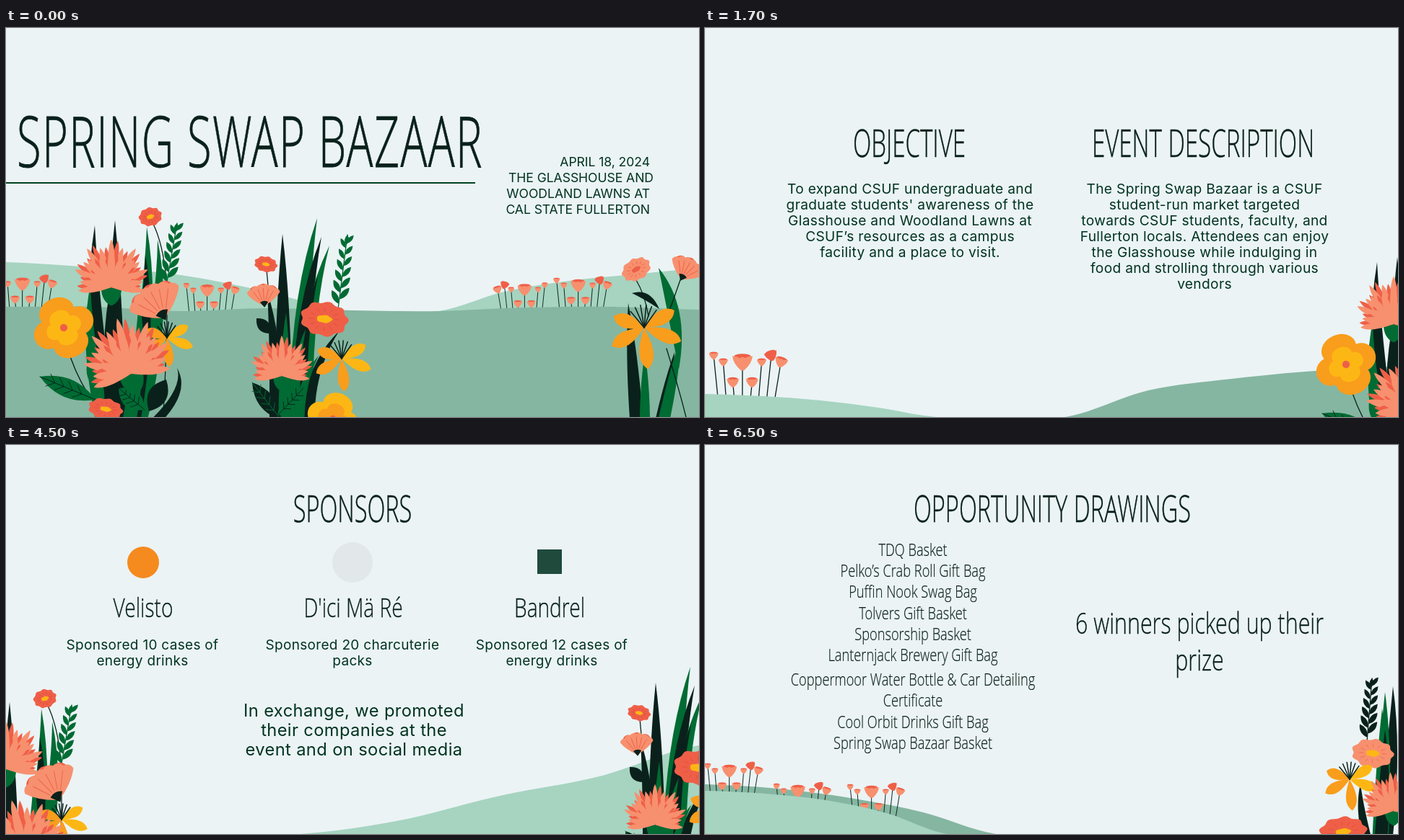
Recreate the animation shown at these times as an HTML page. Size 960 by 540 pixels, loop 8 s.

```html
<!DOCTYPE html>
<html lang="en">
<head>
<meta charset="utf-8">
<title>Spring Swap Bazaar</title>
<style>
html, body { margin: 0; width: 100%; height: 100%; overflow: hidden; background: #ebf3f5; }
svg { display: block; width: 100%; height: 100%; }
.head { font-family: "Open Sans", "Noto Sans", sans-serif; font-weight: 300; }
.body { font-family: Inter, Roboto, sans-serif; font-weight: 400; letter-spacing: .016em; }
.caps { letter-spacing: -.004em; }
</style>
</head>
<body>
<svg id="stage" viewBox="0 0 960 540"></svg>
<script>
const DARK = '#0a211b', GREEN = '#006b33', INK = '#00331f', LIGHT = '#a6d4c0', HILL = '#85b6a1',
  PINK = '#f7906e', RED = '#ef5f48', ORANGE = '#f99d1c', GOLD = '#fdb714', RUST = '#d94a35';

// basic marks
const n = v => Math.round(v * 100) / 100;
const rad = a => a * Math.PI / 180;
const fill = (d, c, more = '') => `<path d="${d}" fill="${c}" ${more}/>`;
const line = (d, c = DARK, w = 1.3) => `<path d="${d}" fill="none" stroke="${c}" stroke-width="${w}" stroke-linecap="round"/>`;
const oval = (x, y, rx, ry, c, more = '') => `<ellipse cx="${n(x)}" cy="${n(y)}" rx="${n(rx)}" ry="${n(ry)}" fill="${c}" ${more}/>`;
const at = (x, y, rot, art) => `<g transform="translate(${x} ${y}) rotate(${rot})">${art}</g>`;
const move = (x, y, art) => at(x, y, 0, art);
const each = (list, fn) => list.map(fn).join('');
const span = (a, b, step) => Array.from({ length: Math.round((b - a) / step) + 1 }, (_, i) => a + i * step);

// smooth hill through evenly spaced heights, filled down to the floor
function hill(x0, x1, ys, c) {
  const step = (x1 - x0) / (ys.length - 1);
  const slope = i => ((ys[i + 1] ?? ys[i]) - (ys[i - 1] ?? ys[i])) / 6;
  const top = each(ys.slice(1), (y, i) => {
    const x = x0 + i * step;
    return `C${n(x + step / 3)} ${n(ys[i] + slope(i))} ${n(x + step * 2 / 3)} ${n(y - slope(i + 1))} ${n(x + step)} ${y}`;
  });
  return fill(`M${x0} ${ys[0]}${top}V540H${x0}Z`, c);
}

// leaf shape from one point to another; taper 1 is pointed at both ends, 0 is open at the root
function lens(x0, y0, x1, y1, w, c, taper = 1, bx = (x0 + x1) / 2, by = (y0 + y1) / 2) {
  const len = Math.hypot(x1 - x0, y1 - y0), k = taper ? 1 : .5;
  const nx = -(y1 - y0) / len * w * k, ny = (x1 - x0) / len * w * k, r = 1 - taper;
  return fill(`M${n(x0 + nx * r)} ${n(y0 + ny * r)}Q${n(bx + nx)} ${n(by + ny)} ${n(x1)} ${n(y1)}` +
    `Q${n(bx - nx)} ${n(by - ny)} ${n(x0 - nx * r)} ${n(y0 - ny * r)}Z`, c);
}

// tuft of blades that share a root and alternate in colour
const grass = (rx, ry, bend, tips) => each(tips, ([x, y], i) =>
  lens(rx + (x - rx) * .45, ry, x, y, 8 + (ry - y) * .06, i % 2 ? GREEN : DARK, 0,
    rx + (x - rx) * bend, ry + (y - ry) * .6));

function leaf(x0, y0, x1, y1, w, c = GREEN, vein = DARK) {
  const dx = x1 - x0, dy = y1 - y0, k = w * .35 / Math.hypot(dx, dy);
  const ribs = each(span(.25, .73, .16), t => {
    const x = x0 + dx * t, y = y0 + dy * t, ex = x + dx * .12, ey = y + dy * .12;
    return line(`M${n(ex - dy * k)} ${n(ey + dx * k)}L${n(x)} ${n(y)}L${n(ex + dy * k)} ${n(ey - dx * k)}`, vein, .9);
  });
  return lens(x0, y0, x1, y1, w, c) + line(`M${x0} ${y0}L${x1} ${y1}`, vein, 1) + ribs;
}

function sprig(x0, y0, x1, y1, c = GREEN, size = 19) {
  const a = Math.atan2(y1 - y0, x1 - x0);
  const leaves = each(span(.1, .85, .15), t => each([-1, 1], side => {
    const k = t + side * .03, x = x0 + (x1 - x0) * k, y = y0 + (y1 - y0) * k;
    const b = a + side * .6, l = size * (1.15 - .4 * t);
    return lens(x, y, x + l * Math.cos(b), y + l * Math.sin(b), l * .38, c);
  }));
  return line(`M${x0} ${y0}L${x1} ${y1}`, c) + leaves + lens(x0 + (x1 - x0) * .86, y0 + (y1 - y0) * .86, x1, y1, 6, c);
}

// flowers
const petal = (l, w, a, c) => fill(`M0 0C${n(-w * .7)} ${n(-l * .4)} ${n(-w * 1.1)} ${n(-l * .78)} 0 ${n(-l)}` +
  `C${n(w * 1.1)} ${n(-l * .78)} ${n(w * .7)} ${n(-l * .4)} 0 0Z`, c, `transform="rotate(${n(a)})"`);

function mum(x, y, r, rot = 0) {
  const base = fill(`M${n(-.22 * r)} 0Q${n(-.22 * r)} ${n(.3 * r)} 0 ${n(.4 * r)}Q${n(.22 * r)} ${n(.3 * r)} ${n(.22 * r)} 0Z`, GREEN);
  const fan = (edge, step, size, w, c) => each(span(-edge, edge, step), (a, i) =>
    petal(r * (.72 + .28 * Math.cos(rad(a))) * size * (i % 2 ? .9 : 1.04), r * w, a, c));
  return at(x, y, rot, base + fan(88, 16, .98, .09, RED) + fan(96, 16, 1, .1, PINK) +
    fan(70, 20, .72, .08, RED) + fan(80, 20, .8, .115, PINK));
}

function pansy(x, y, r, rot = 0, outer = ORANGE, inner = GOLD, eye = RED) {
  const ring = (k, c) => each(span(0, 270, 90), (a, i) =>
    oval(r * k * .55, 0, r * k * .46, r * k * (i % 2 ? .58 : .46), c, `transform="rotate(${a})"`));
  return at(x, y, rot, oval(0, 0, r * .4, r * .4, outer) + ring(1, outer) + ring(.58, inner) + oval(0, 0, r * .12, r * .12, eye));
}

// poppy seen from the side, (x, y) is its foot
function cup(x, y, r, rot = 0) {
  const p = (a, k) => `${n(r * k * Math.sin(a))} ${n(-r * k * Math.cos(a))}`;
  const edge = each(span(-.6, .9, .3), a => `Q${p(a - .15, 1.08)} ${p(a, .97)}`);
  return at(x, y, rot,
    each(span(-.5, .5, .5), a => oval(r * .8 * Math.sin(a), -r * .8 * Math.cos(a), r * .25, r * .24, RED)) +
    fill(`M0 0Q${p(-1.1, .6)} ${p(-.9, .97)}${edge}Q${p(1.1, .6)} 0 0Z`, PINK) +
    each(span(-.6, .6, .3), a => line(`M${p(a, .3)}L${p(a, .82)}`, RED, .9)) +
    fill(`M${p(-.8, .26)}Q0 ${n(-r * .3)} ${p(.8, .26)}L0 ${n(r * .06)}Z`, DARK));
}

// open poppy
function bloom(x, y, rx, ry, rot = 0, c = RED, mark = RUST, eye = GOLD) {
  const wavy = (k, m, flat) => 'M' + span(0, 6.2, .1).map(a => {
    const q = k * (1 + .06 * Math.cos(m * a) + .03 * Math.sin(2 * a));
    return `${n(rx * q * Math.cos(a))} ${n(ry * q * flat * Math.sin(a))}`;
  }).join('L') + 'Z';
  const rays = each(span(0, 330, 30), a => {
    const u = rx * Math.cos(rad(a)), v = ry * Math.sin(rad(a));
    return line(`M${n(u * .45)} ${n(v * .45)}L${n(u * .65)} ${n(v * .65)}`, mark, .7);
  });
  return at(x, y, rot, fill(wavy(.97, 9, 1), c) + rays + fill(wavy(.32, 5, .7), eye));
}

function lily(x, y, r, c = GOLD, rot = 0) {
  const petals = each([200, -30, 150, 20, 85], (a, i) => petal(r * (.85 + .06 * i), r * .27, a + 90, i % 2 ? c : ORANGE));
  const threads = each(span(-45, 40, 17), a =>
    line(`M0 0L${n(r * .5 * Math.sin(rad(a)))} ${n(-r * .6 * Math.cos(rad(a)))}`, DARK, 1.5));
  return at(x, y, rot, petals + threads);
}

// eight small poppies: two low ones, a big one in the middle, the last two tilted
function row(x, y, s = .75, flip = 1) {
  const art = each(span(0, 7, 1), i => {
    const low = i === 2 || i === 4, late = i > 5;
    const hx = i * 13.3 - 39, hy = low ? 30 : i % 2 ? 2 : -7;
    const size = i === 3 ? 14 : low ? 8.5 : late ? 9 : 6.5;
    return line(`M${n(hx)} ${hy}L${n(hx * .85)} 51`) +
      `<g transform="translate(${n(hx)} ${hy}) rotate(${late ? 34 * (i - 6.5) : 0}) scale(${size})">` +
      oval(0, -.6, .82, .24, RED) +
      fill('M-1-.6Q-.5-.6-.3-.4Q0-.65 .3-.4Q.5-.6 1-.6Q.9 .2 .15 .8H-.15Q-.9 .2-1-.6Z', i === 6 ? RED : PINK) + '</g>';
  });
  return `<g transform="translate(${x} ${y}) scale(${s * flip} ${s})">${art}</g>`;
}

// bouquets
const bedA =
  grass(155, 560, 1.2, [[123, 274], [195, 276], [151, 267], [210, 294], [193, 315], [117, 357], [142, 375], [184, 375], [237, 472]]) +
  line('M203 270Q218 300 222 350T215 590') + line('M84 440Q95 480 118 515') +
  sprig(222, 358, 237, 271) + lens(114, 488, 115, 458, 6, GREEN) +
  leaf(124, 516, 47, 484, 26) + leaf(192, 530, 156, 500, 26) + lens(198, 532, 222, 488, 26, DARK) +
  bloom(200, 262, 16, 13, -20) + mum(146, 360, 64) + pansy(80, 416, 43, -25) +
  lily(223, 430, 37) + cup(220, 403, 50, -28) + mum(173, 480, 76, -14) + bloom(138, 529, 24, 15, 8);

const bedB =
  grass(385, 560, .4, [[383, 286], [431, 264], [437, 290], [448, 302], [432, 345], [415, 418], [362, 365], [388, 395], [462, 420], [433, 455]]) +
  line('M361 336L367 400') + sprig(460, 390, 473, 287) +
  lens(347, 403, 367, 424, 16, DARK) + leaf(381, 544, 341, 492, 22, DARK, GREEN) + leaf(376, 538, 412, 500, 20) +
  bloom(360, 328, 16, 11, 8) + cup(358, 386, 30, -4) + bloom(441, 404, 33, 24, 3) +
  mum(382, 483, 54) + lily(465, 459, 42) + pansy(453, 542, 36, 20, GOLD, ORANGE);

const bedC =
  grass(885, 560, .8, [[862, 382], [885, 452], [926, 450], [936, 425]]) +
  lens(932, 474, 904, 333, 16, GREEN, 1, 932, 390) + lens(905, 390, 867, 368, 9, DARK, 1, 888, 368) +
  line('M935 347Q924 380 912 410') + line('M873 350Q885 370 890 400') + line('M915 445Q932 500 942 540') +
  bloom(873, 335, 21, 15, -34, PINK, RED, RED) + cup(935, 349, 32, 28) + lily(884, 416, 53, ORANGE);

const bedD =
  sprig(68, 345, 54, 285, DARK, 15) + sprig(172, 402, 185, 320, DARK, 17) +
  grass(115, 560, 1.05, [[128, 302], [157, 322], [71, 303], [27, 424], [186, 300], [190, 355], [120, 352], [72, 375], [160, 400]]) +
  line('M211 312L190 400') + line('M47 423L55 450') + sprig(118, 530, 106, 445, DARK) + leaf(112, 432, 92, 380, 20) +
  cup(152, 308, 27, -6) + pansy(214, 304, 20, 25, GOLD, ORANGE, ORANGE) + bloom(146, 341, 19, 13, 18) +
  mum(67, 373, 48, 6) + cup(194, 382, 40, 35) + cup(47, 424, 32, 2) +
  lily(158, 404, 44) + pansy(75, 463, 39, 35, RED, PINK, GOLD) +
  bloom(162, 477, 38, 28, 8, PINK, RED, RED) + bloom(62, 520, 20, 12, -4, PINK, RED, RED) + lily(118, 524, 40);

const bedE =
  grass(825, 560, .7, [[813, 419], [846, 393], [884, 412], [794, 409], [804, 433], [904, 488], [852, 485]]) +
  line('M858 412L855 450') + lens(830, 442, 854, 416, 17, DARK) +
  mum(857, 403, 41) + pansy(851, 465, 32, 20) + leaf(833, 544, 902, 505, 24) +
  mum(792, 558, 46) + bloom(889, 540, 22, 12);

const bedF =
  grass(930, 560, 1.1, [[953, 335], [942, 343], [908, 470], [938, 366], [942, 395]]) +
  sprig(917, 412, 924, 324, DARK) + bloom(925, 428, 29, 20, 3, PINK, RED) +
  lily(893, 464, 40) + mum(953, 508, 52, -4) + bloom(884, 537, 33, 21, -8);

// text
const label = (x, y, s, cls, size, c = INK, more = '') =>
  `<text x="${x}" y="${y}" class="${cls}" font-size="${size}" fill="${c}" text-anchor="middle" ${more}>${s}</text>`;
const thin = (k, x, y, s, size, c = DARK, more = '') => `<g transform="translate(${x} ${y}) scale(${k} 1)">` +
  label(0, 0, s, 'head', size, c, `stroke="${c}" stroke-width="${n(size * .008)}" ${more}`) + '</g>';
const title = (...a) => thin(.625, ...a);
const note = (...a) => thin(.76, ...a);
const para = (x, y, gap, size, c, lines) => each(lines, (s, i) => label(x, y + i * gap, s, 'body', size, c));

const place = each(['APRIL 18, 2024', 'THE GLASSHOUSE AND', 'WOODLAND LAWNS AT', 'CAL STATE FULLERTON'], (s, i) =>
  `<text x="${i === 1 ? 897 : 892}" y="${192 + i * 22}" class="body caps" font-size="17.6" fill="${INK}" text-anchor="end">${s}</text>`);

const cover =
  hill(0, 470, [325, 332, 342, 364, 392], LIGHT) + hill(600, 960, [393, 366, 351, 342, 334], LIGHT) +
  row(22, 354, .77) + row(278, 363, .72) + row(719, 362, .7, -1) + row(792, 356, .75) +
  hill(0, 960, [387, 387, 393, 389, 392, 393, 388, 387, 391], HILL) +
  bedA + bedB + bedC +
  title(338, 193, 'SPRING SWAP BAZAAR', 98, DARK, 'letter-spacing=".025em"') +
  fill('M0 214H650V216H0Z', '#00421f') + place;

const about =
  row(51, 462, 1) + hill(0, 320, [508, 511, 517, 527, 540], LIGHT) + hill(499, 960, [540, 503, 487, 476, 470], HILL) +
  move(808, 51, bedA) +
  title(283, 179, 'OBJECTIVE', 53) + title(690, 179, 'EVENT DESCRIPTION', 53) +
  para(284, 230, 22, 19.2, INK, ['To expand CSUF undergraduate and', "graduate students' awareness of the",
    'Glasshouse and Woodland Lawns at', 'CSUF’s resources as a campus', 'facility and a place to visit.']) +
  para(692, 230, 22, 19.2, INK, ['The Spring Swap Bazaar is a CSUF', 'student-run market targeted',
    'towards CSUF students, faculty, and', 'Fullerton locals. Attendees can enjoy',
    'the Glasshouse while indulging in', 'food and strolling through various', 'vendors']);

const crowd =
  row(247, 408, .73) + row(625, 453, .73, -1) + row(718, 422, .73) + row(966, 409, .73, -1) +
  hill(0, 515, [415, 423, 436, 455, 491], LIGHT) + hill(370, 960, [540, 490, 460, 446, 438], HILL) +
  bedD + bedE +
  thin(.78, 480, 183, '580+', 78, GREEN, 'dy="7 -7 0"') +
  label(480, 236, 'ESTIMATED ATTENDANCE', 'body caps', 17.6, DARK) +
  para(480, 320, 32, 26.8, DARK, ['How can next year’s class', 'more accurately count this?']);

const sponsors =
  hill(408, 960, [540, 521, 487, 460, 417], LIGHT) +
  move(-146, 90, bedA) + move(517, 44, bedB) +
  title(480, 107, 'SPONSORS', 52) +
  oval(190, 163, 22, 22, '#f58a1f') + oval(480, 163, 28, 28, '#e2e8e9') + fill('M736 145H770V179H736Z', '#1f4a3c') +
  note(190, 239, 'Velisto', 37) + note(481, 239, "D'ici Mä Ré", 37) + note(753, 239, 'Bandrel', 37) +
  para(189, 284, 22, 19, INK, ['Sponsored 10 cases of', 'energy drinks']) +
  para(480, 284, 22, 19, INK, ['Sponsored 20 charcuterie', 'packs']) +
  para(756, 284, 22, 19, INK, ['Sponsored 12 cases of', 'energy drinks']) +
  para(482, 377, 27, 23.7, INK, ['In exchange, we promoted', 'their companies at the', 'event and on social media']);

const prizes = ['TDQ Basket', 'Pelko’s Crab Roll Gift Bag', 'Puffin Nook Swag Bag', 'Tolvers Gift Basket',
  'Sponsorship Basket', 'Lanternjack Brewery Gift Bag', 'Coppermoor Water Bottle &amp; Car Detailing',
  'Certificate', 'Cool Orbit Drinks Gift Bag', 'Spring Swap Bazaar Basket'];
const drawings =
  hill(0, 403, [471, 477, 490, 510, 540], HILL) +
  row(33, 451, .75) + row(128, 479, .74) + row(230, 480, .74) +
  hill(0, 335, [480, 484, 493, 511, 540], LIGHT) +
  bedF +
  title(481, 107, 'OPPORTUNITY DRAWINGS', 52) +
  each(prizes, (s, i) => note(288, 154 + i * 29.2 + (i > 5 ? 5 : 0), s, 24)) +
  note(685, 262, '6 winners picked up their', 40) + note(685, 313, 'prize', 40);

// slide show
const LOOP = 8000;
const slides = [[500, cover], [2500, about], [4500, crowd], [6500, sponsors], [LOOP, drawings]];
const stage = document.getElementById('stage');
stage.innerHTML = '<rect width="960" height="540" fill="#ebf3f5"/>' + each(slides, ([, art]) => `<g class="slide">${art}</g>`);
const groups = [...stage.querySelectorAll('.slide')];

function show(now) {
  const t = now % LOOP;
  const current = slides.findIndex(([end]) => t < end);
  groups.forEach((g, i) => { g.style.display = i === current ? '' : 'none'; });
}
function tick() {
  show(performance.now());
  requestAnimationFrame(tick);
}
show(0);
requestAnimationFrame(tick);
</script>
</body>
</html>
```
